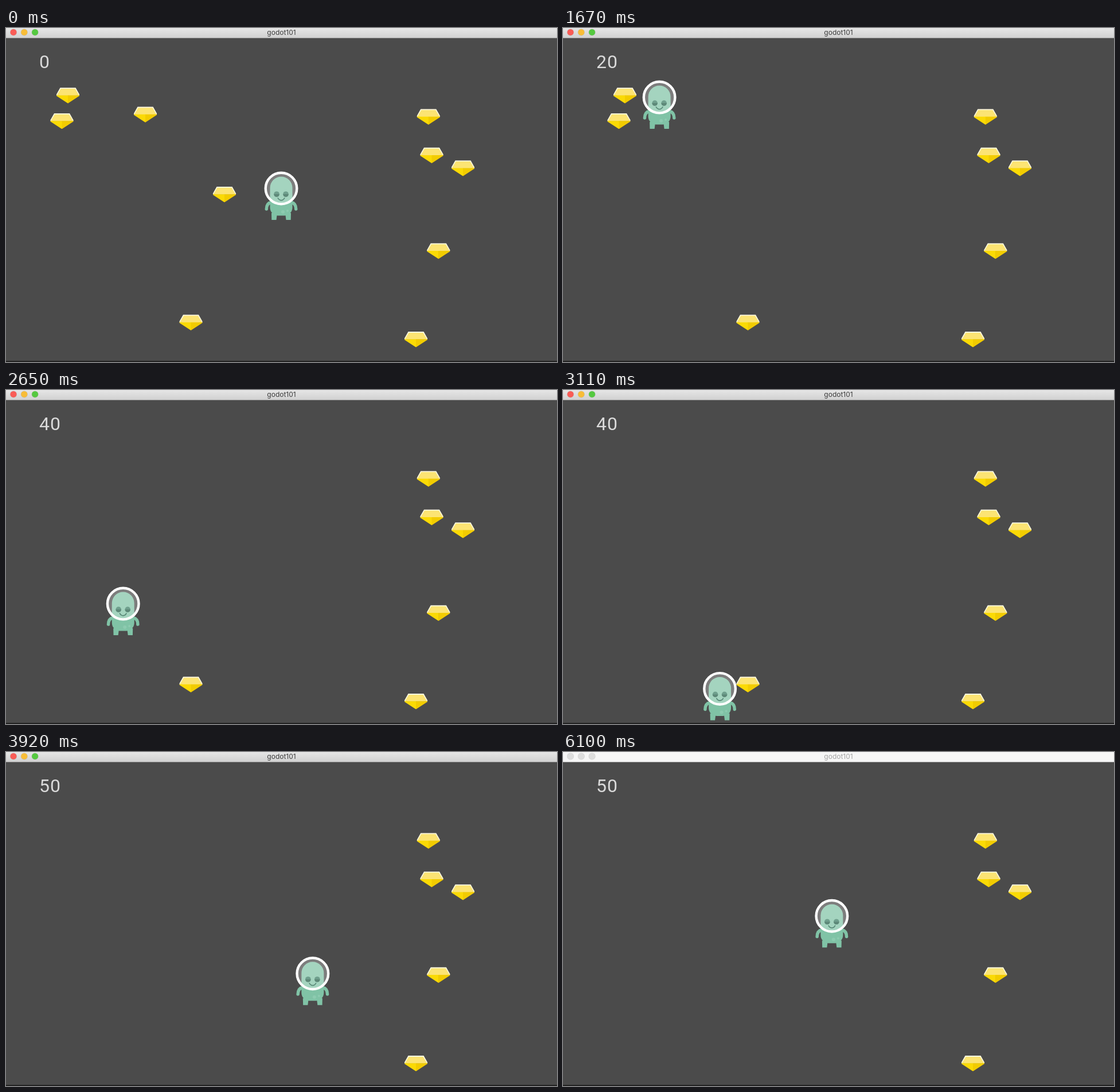
Recreate the animation shown at these times as an HTML page with a canvas. Size 961x583 px, loop 6.2 s.

```html
<!DOCTYPE html>
<html lang="en">
<head>
<meta charset="utf-8">
<title>godot101</title>
<style>
  html, body { margin: 0; width: 100%; height: 100%; overflow: hidden; background: #4b4b4b; }
  canvas { display: block; width: 100vw; height: 100vh; }
</style>
</head>
<body>
<canvas id="stage" width="961" height="583"></canvas>
<script>
const ctx = document.getElementById('stage').getContext('2d');
const LOOP = 6200;
const BLUR_AT = 6100;
const START_AT = 738;
const SPEED = 0.411; // px per ms
const START = { x: 480, y: 280 };

// Arrow keys held, with the time in ms; "-" is a pause
const keys = 'L275 LU547 -14 L285 LD110 D182 RD668 D242 R383 -24 RU428 U109 LU227';
const legs = keys.split(' ').map(key => {
  const axis = (plus, minus) => key.includes(plus) - key.includes(minus);
  const dx = axis('R', 'L'), dy = axis('D', 'U');
  const pace = SPEED / (Math.hypot(dx, dy) || 1);
  return { vx: dx * pace, vy: dy * pace, time: Number(key.match(/\d+/)) };
});

function positionAt(t) {
  let { x, y } = START;
  let rest = Math.max(0, t - START_AT);
  for (const { vx, vy, time } of legs) {
    const held = Math.min(rest, time);
    x += vx * held;
    y += vy * held;
    rest -= held;
  }
  return { x, y };
}

const gems = [
  [108, 117.7], [97.5, 162.5], [243, 151], [381, 290.5], [322.5, 514],
  [736.8, 155], [742.5, 222.2], [797, 244.7], [754.3, 389.3], [715, 543.6]
].map(([x, y]) => ({ x, y, takenAt: pickupTime(x, y) }));

// The body reaches out as an upright ellipse around its middle
function pickupTime(x, y) {
  for (let t = START_AT; t < BLUR_AT; t += 10) {
    const alien = positionAt(t);
    if (Math.hypot((alien.x - x) / 25, (alien.y + 13 - y) / 40) < 1) return t;
  }
  return Infinity;
}

function polygon(color, ...points) {
  ctx.fillStyle = color;
  ctx.beginPath();
  for (let i = 0; i < points.length; i += 2) ctx.lineTo(points[i], points[i + 1]);
  ctx.fill();
}

function disc(color, x, y, r, from = 0, to = Math.PI * 2) {
  ctx.fillStyle = color;
  ctx.beginPath();
  ctx.arc(x, y, r, from, to);
  ctx.fill();
}

function ring(color, width, y, r, from = 0, to = Math.PI * 2) {
  ctx.strokeStyle = color;
  ctx.lineWidth = width;
  ctx.beginPath();
  ctx.arc(0, y, r, from, to);
  ctx.stroke();
}

function at({ x, y }, draw) {
  ctx.save();
  ctx.translate(x, y);
  draw();
  ctx.restore();
}

function drawGem() {
  polygon('#fff9e0', -13.5, -13.5, 13.5, -13.5, 20, -2, 20, 0, -20, 0, -20, -2);
  polygon('#fce473', -12.5, -11.7, 12.5, -11.7, 19.5, 0, -19.5, 0);
  polygon('#fbda05', -20, -0.3, 0.5, -0.3, 0.5, 13.5, -0.5, 13.5, -20, 0.7);
  polygon('#f2cc00', 0, -0.3, 20, -0.3, 20, 0.7, 0.5, 13.5, 0, 13.5);
}

function drawAlien() {
  const skin = '#80c3a6';
  ctx.lineCap = 'round';
  ctx.strokeStyle = skin;
  ctx.lineWidth = 5.5;
  for (const side of [-1, 1]) {
    ctx.beginPath();
    ctx.moveTo(side * 18, 24.5);
    ctx.quadraticCurveTo(side * 25.5, 26, side * 25.7, 36);
    ctx.stroke();
    polygon(skin, side * 17, 43, side * 16.7, 55, side * 8.5, 55, side * 7, 43);
  }

  ctx.fillStyle = skin;
  ctx.beginPath();
  ctx.roundRect(-19.5, -20.5, 39, 68, [19.5, 19.5, 14, 14]);
  ctx.fill();
  disc('#8dcbb0', 3, 41, 3);
  disc('#8dcbb0', 11, 39, 2);

  disc('rgba(255,255,255,.28)', 0, 0, 27.5);

  for (const x of [-8, 8]) {
    disc('#6f9f8d', x, 10, 4.8);
    disc('#5d8878', x, 10, 4.8, 0, Math.PI);
  }
  ring('#568775', 1.6, 14.5, 6.2, Math.PI * 0.12, Math.PI * 0.88);
  ring('#fff', 4.4, 0, 27.3);
}

function drawText(text, x, y, font, color, align, spacing) {
  ctx.fillStyle = color;
  ctx.font = font;
  ctx.textAlign = align;
  ctx.letterSpacing = spacing;
  ctx.fillText(text, x, y);
}

function drawTitleBar(focused) {
  const bar = ctx.createLinearGradient(0, 0, 0, 17);
  bar.addColorStop(0, focused ? '#e6e6e6' : '#f6f6f6');
  bar.addColorStop(1, focused ? '#d1d1d1' : '#f6f6f6');
  ctx.fillStyle = bar;
  ctx.fillRect(0, 0, 961, 17);
  ctx.fillStyle = focused ? '#b4b4b4' : '#d5d5d5';
  ctx.fillRect(0, 17, 961, 0.7);

  ['#f95c56', '#f8bd37', '#55c940'].forEach((color, i) => {
    const x = 13 + i * 18.8;
    disc(focused ? '#00000022' : '#d0d0d0', x, 7.4, 6);
    disc(focused ? color : '#dddddd', x, 7.4, 5.5);
  });

  const ink = focused ? '#3d3d3d' : '#a5a5a5';
  drawText('godot101', 480.5, 12, '12px Inter, sans-serif', ink, 'center', '0px');
}

function render(t) {
  ctx.fillStyle = '#4b4b4b';
  ctx.fillRect(0, 0, 961, 583);
  ctx.fillStyle = '#222';
  ctx.fillRect(0, 581, 961, 2);
  drawTitleBar(t < BLUR_AT);

  const left = gems.filter(gem => t < gem.takenAt);
  for (const gem of left) at(gem, drawGem);
  const score = (gems.length - left.length) * 10;
  drawText(score, 58, 69.7, '32px Roboto, sans-serif', '#dadada', 'left', '1px');
  at(positionAt(t), drawAlien);
}

const begin = performance.now();
function frame() {
  render((performance.now() - begin) % LOOP);
  requestAnimationFrame(frame);
}
frame();
</script>
</body>
</html>
```
